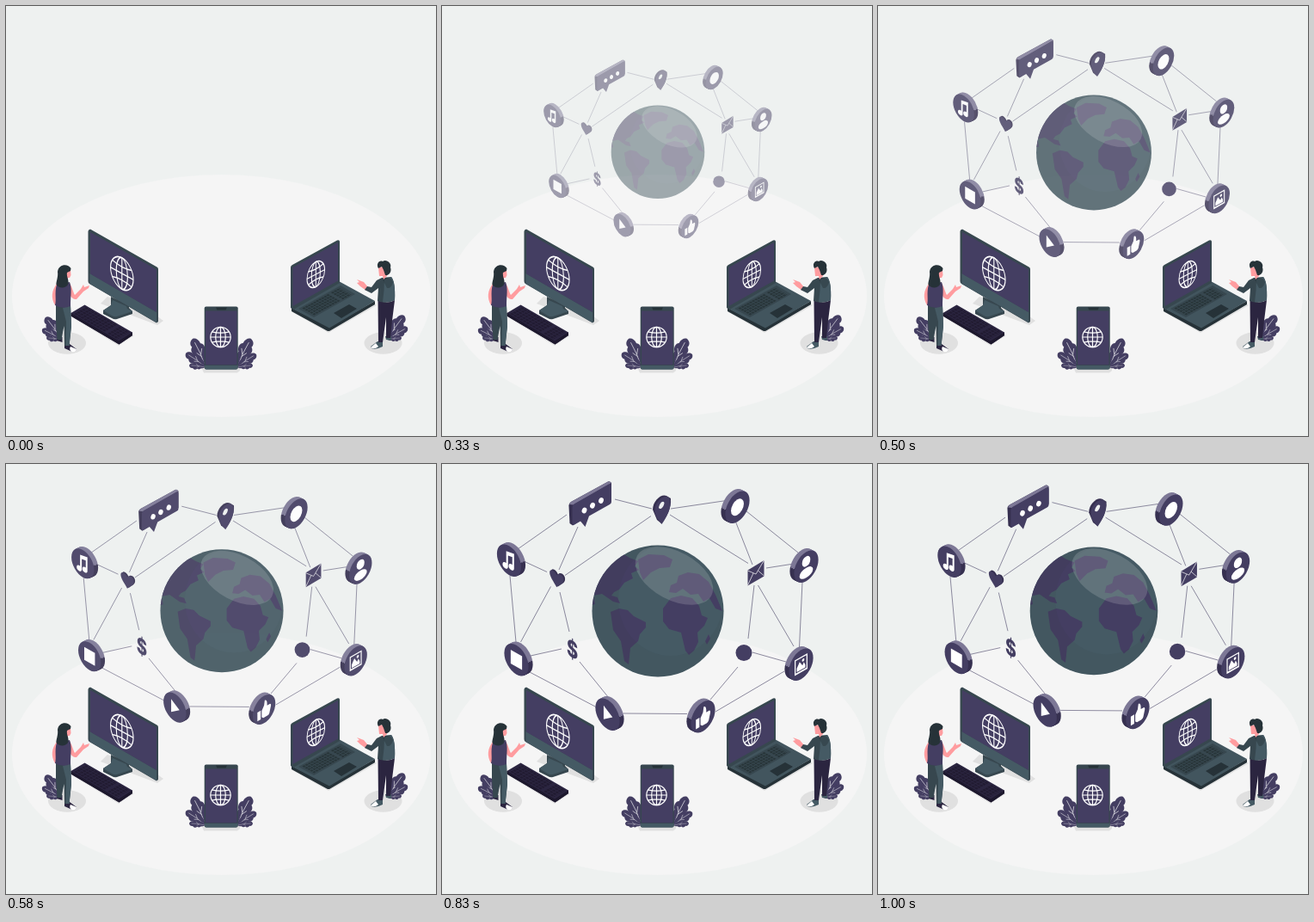
Recreate the animation shown at these times as an HTML page. Size 500 by 500 pixels, loop 1040 ms.

```html
<!DOCTYPE html>
<html lang="en">
<head>
<meta charset="utf-8">
<title>Connected world</title>
<style>
  html, body { margin: 0; width: 100%; height: 100%; overflow: hidden; background: #eef1f0; }
  svg { display: block; width: 100vw; height: 100vh; }
  .purple { fill: #443e62; }
  .dusk { fill: #363050; }
  .night { fill: #2b2540; }
  .slate { fill: #455a64; }
  .deep { fill: #37474f; }
  .ink { fill: #263238; }
  .skin { fill: #ff9c9f; }
  .shade { fill: #e0e0e0; }
  .white { fill: #fff; }
  .line { fill: none; stroke: #fff; }
  .links { fill: none; stroke: #443e62; stroke-width: .6; }
</style>
</head>
<body>
<svg viewBox="0 0 500 500">
  <defs>
    <linearGradient id="rim" x1="0" y1="0" x2="0" y2="1">
      <stop offset=".38" stop-color="#7d7896"/>
      <stop offset=".38" stop-color="#363050"/>
    </linearGradient>
    <clipPath id="ball"><circle cx="251" cy="171" r="76.5"/></clipPath>
    <g id="web" class="line">
      <circle r="11.700"/>
      <ellipse rx="5.800" ry="11.700"/>
      <path d="M0-11.700V11.700M-11.700 0H11.700M-10-6.200Q0-3.600 10-6.200M-10 6.200Q0 3.600 10 6.200"/>
    </g>
    <g id="leaf">
      <path class="purple" d="M0 0C4-5 8-8 14-6.500C17-10 22-9 23-6C27-6 30-3 30 0C29 4 26 6 23 4.500C21 8 17 8 15 5C12 7 9 6 8 3.500C5 3.500 2 2 0 0Z"/>
      <path class="line" stroke-width=".6" opacity=".85" d="M1 0Q14-2 26-.5M13-1.200L18-5M11-1L16 2.500"/>
    </g>
    <path id="love" d="M0-4C-3-9-9-8-9-3C-9 2-4 5 0 10C4 5 9 2 9-3C9-8 3-9 0-4Z"/>
  </defs>

  <ellipse cx="250.500" cy="337" rx="243.500" ry="141" fill="#f5f5f5"/>
  <g class="shade">
    <ellipse cx="71" cy="392" rx="22" ry="12.700"/>
    <ellipse cx="438.500" cy="392" rx="22" ry="12.700"/>
    <path d="M110 346L176 371L183 366L172 358L118 338ZM75 361L131 395L149 383L140 380ZM228 422L233 420H272V424L269 426.500H230ZM333 356L375 380L431 348L420 342Z"/>
  </g>
  <g id="plants"></g>

  <!-- desktop -->
  <path class="deep" d="M113 354L122 348V338L143 348V351L147 355V358L129 364Q126 365 123 363L113 358Z"/>
  <path class="slate" d="M113 354L122 348L124 342L140 349L141 352L147 355L129 361Q126 362 123 360Z"/>
  <path class="deep" d="M95.500 262Q95.500 260 98 259.500L175.500 303.500Q177 304 177 306V367L175 368.500L97 323Q95.500 322 95.500 320Z"/>
  <path class="slate" d="M97.500 311L175 356V368L97.500 323Z"/>
  <path class="purple" d="M98 263L175 306.500V356L98 311.500Z"/>
  <use href="#web" transform="matrix(1.130 .620 0 1.560 134.800 311)" stroke-width="1"/>
  <path class="night" d="M75.500 357L91.500 347.500L147 379.500V383L131.500 393.500L75.500 360.500Z"/>
  <path d="M75.500 357L131 389.500L147 379.500V383L131.500 393.500L75.500 360.500Z" fill="#1d182d"/>
  <g id="deskKeys" transform="matrix(.55 .32 -.16 .09 92 348.300)" stroke="#211b31"></g>

  <!-- laptop -->
  <path class="ink" d="M332 351L376 373L429 343V347L377 377.500Q375 378.500 373 377.500L332 355Z"/>
  <path d="M332 351.500L387 320L429 343L376 374.500Z" fill="#42555e"/>
  <path class="deep" d="M331 304Q331 302 333 301L385 272.500Q388 271.500 388 274V322L334 353L331 351Z"/>
  <path class="purple" d="M333.500 304L386 275V319.500L333.500 349Z"/>
  <use href="#web" transform="matrix(.880 -.460 0 1.240 360.300 312)" stroke-width="1.150"/>
  <path class="deep" d="M340 352L389 325L406 335L358 362Z"/>
  <g id="lapKeys" transform="matrix(.47 -.257 .16 .09 341.500 352)" stroke="#283539"></g>
  <path class="ink" d="M381 357L399 347L408 352L390 363Z"/>

  <!-- phone -->
  <rect class="deep" x="230.700" y="349.500" width="39" height="73" rx="2"/>
  <path class="slate" d="M231 418H269.500V420.500Q269.500 422.500 267.500 422.500H233Q231 422.500 231 420.500Z"/>
  <rect class="purple" x="232" y="354.500" width="36.500" height="62.800"/>
  <path class="ink" d="M244 350.500H257L255.500 353.500H245.500Z"/>
  <use href="#web" transform="translate(249.500 385)" stroke-width="1.200"/>

  <!-- woman -->
  <path class="skin" d="M59 323C53 331 52 339 57 348L60 347C57 340 59 334 62 330Z"/>
  <path class="night" d="M60 385H65.500V391L59 389Z"/>
  <path class="night" d="M68 393H74L82 399Q82 402 77 402L68 398Z"/>
  <path class="white" d="M75 396L82 399Q82 403 76 402Q73 399 75 396Z"/>
  <path class="deep" d="M58 346Q66 352 75 348L76 372L73.500 395H68L67.500 372L64.500 388H59.500L58 366Z"/>
  <path class="slate" d="M66 351L75 348L76 372L73.500 395H69.500L70 367Z"/>
  <path class="skin" d="M73 321C77 326 78 333 80 336L87 329L90 324L91 327L97 325L96 328L90 332L82 341C76 342 73 334 72 328Z"/>
  <path class="purple" d="M59 324L74 321C77 329 75 336 75 349Q66 353 57 348C59 341 56 334 59 324Z"/>
  <path class="skin" d="M69 304L75 307L75.500 313L74 316H72V321L68 320Z"/>
  <path class="ink" d="M60 309C61 300 72 299 75.500 305L75 308L71 310C70 315 74 319 72 324C69 329 61 328 58.500 324C58 321 61 315 60 309Z"/>

  <!-- man -->
  <path class="slate" d="M441 384H448V389L442 388Z"/>
  <path class="slate" d="M432 390H438V396Q430 400 425 398L424 396Z"/>
  <path class="white" d="M430 392L433 396Q428 400 424 397Z"/>
  <path class="night" d="M432.500 342Q443 347 452 342L449 366L447 386H442L442 362L438 391H433Z"/>
  <path class="skin" d="M421 327L416 321L408 318L411 321L408 322L412 326L419 331Z"/>
  <path class="deep" d="M437 316L448 315Q453 321 452 342Q442 347 432 343L433 328L425 334L417 330L420 326L425 327L431 319Z"/>
  <path class="slate" d="M440 318L448 315Q453 321 452 342Q445 345 438 344Q440 330 440 318Z"/>
  <path class="ink" d="M438 318Q447 313 450 321Q448 329 443 328Z" opacity=".45"/>
  <path class="skin" d="M433 304L441 303L443 314L439 318L438 314H434Z"/>
  <path class="ink" d="M433 305C430 300 434 295 438 297C442 294 449 299 447 304C449 309 445 314 441 313L439 307L437 303Z"/>

  <!-- network -->
  <g id="net">
    <path class="links" d="M201 41L244 52M266 52L334 42M354 55L414 103M341 66L361 117M265 59L356 115.500M377 121L409 116M419 137L415.500 213M367.500 141L409 212M363 141L356 203M361 219L400 230M344 236L312 274M398 241L318 288M285 290.500L211 290M180 283L102 242M194 272L160 230M103 223L139 215M86 207L79 130M91.500 207L126.500 142.500M137 149L148 195M95 113L122 125.500M88 99L145 59M136 123L158 73M143 129.500L243 60.500"/>

    <circle class="slate" cx="251" cy="171" r="76.500"/>
    <g clip-path="url(#ball)">
      <path class="purple" d="M170 150L190 118L208 103L218 109L228 113L224 119L229 123L220 127L222 133L212 138L206 146L200 149L197 153L204 155L207 162L199 160L186 151L176 153L178 163L170 165Z
        M196 172L206 168L216 170L223 177L237 184L237 190L230 198L228 206L219 214L217 233L212 229L208 206L199 193Z
        M228 111L240 105L258 106L268 111L265 120L253 121L243 126L234 135L230 126Z
        M257 168L266 156L278 153L291 156L299 165L302 176L309 179L305 188L297 196L298 207L293 217L287 222L283 217L278 196L264 192L257 183Z
        M264 149L266 141L273 138L275 130L286 126L299 128L310 137L318 152L326 171L318 168L311 156L304 160L298 151L289 152L280 145L272 150Z
        M306 206L310 198L312 203L308 210Z"/>
      <path d="M174 94H328V248H174ZM205 158A61 65 0 1 0 327 158A61 65 0 1 0 205 158Z" fill-rule="evenodd" fill="#263238" opacity=".08"/>
      <ellipse cx="270" cy="130" rx="49" ry="28" transform="rotate(28 270 130)" fill="#fff" opacity=".15"/>
    </g>

    <!-- chat bubble -->
    <path class="dusk" d="M147.500 49Q147 46 150 44L193 20.500Q195 19.500 197 22L197 43L152 71.500L148.500 69Z"/>
    <path d="M148 47L150 44L193 20.500Q195 19.500 197 22L153 47.500Z" fill="#7d7896"/>
    <path class="purple" d="M151.500 50Q151.500 48 153.500 46.500L194 23.500Q197 22 197 25V44Q197 46 195 47L171 60.500L166.500 73L161 66.500L154 70.500Q151.500 72 151.500 69Z"/>
    <g class="white">
      <ellipse cx="165.500" cy="54" rx="2.800" ry="3.500" transform="rotate(20 165.500 54)"/>
      <ellipse cx="175" cy="48.300" rx="2.800" ry="3.500" transform="rotate(20 175 48.300)"/>
      <ellipse cx="185" cy="42.500" rx="2.800" ry="3.500" transform="rotate(20 185 42.500)"/>
    </g>

    <!-- pin -->
    <path class="dusk" d="M245 53C245 43 255 34 261 37L266 40C267 52 261 62 255 69L250 65Z"/>
    <path class="purple" d="M247.500 55C247 45 257 35 263 38.500C269 43 264 58 255.500 70C252 66 248 61 247.500 55Z"/>
    <path d="M252 51C253 45 257 42 258.500 45C258 50 254 54 252 51Z" fill="#eef1f0"/>

    <!-- envelope -->
    <path class="purple" d="M355.500 123.500L374.500 112V130.500L355.500 141.500Z"/>
    <path class="line" stroke-width=".7" d="M355.500 124L365 128L374.500 112M355.500 141L362 127M374.500 130L367.500 124"/>

    <use href="#love" class="dusk" transform="matrix(.900 .480 0 1 135 132.500)"/>
    <use href="#love" class="purple" transform="matrix(.900 .480 0 1 133.300 133.300)"/>

    <text class="purple" transform="matrix(.740 .400 0 1 151.500 215.500)" y="9.500" font-family="Inter, Arial, sans-serif" font-size="27" font-weight="800" text-anchor="middle">$</text>
    <circle class="purple" cx="351" cy="219.500" r="9.500"/>
    <g id="coins"></g>
  </g>
</svg>
<script>
const $ = id => document.getElementById(id);

// base x, base y, tip x, tip y
const leaves = [
  [64, 388, 46, 362], [64, 388, 42, 376], [64, 388, 47, 386],
  [444, 388, 463, 360], [444, 388, 467, 374], [444, 388, 460, 386],
  [232, 420, 217, 387], [232, 420, 209, 404], [232, 420, 213, 418],
  [269, 420, 285, 387], [269, 420, 291, 405], [269, 420, 287, 418]
];
$('plants').innerHTML = leaves.map(([x, y, tx, ty]) => {
  const turn = Math.atan2(ty - y, tx - x) * 180 / Math.PI;
  const size = Math.hypot(tx - x, ty - y) / 30;
  const flip = tx < x ? -1 : 1;
  return `<use href="#leaf" transform="translate(${x} ${y}) rotate(${turn}) scale(${size} ${size * flip * .85})"/>`;
}).join('');

// Rows of keys are dashed lines in the keyboard's own plane.
function keys(id, rows) {
  const step = 92 / rows;
  $(id).innerHTML = Array.from({ length: rows }, (_, i) => {
    const y = 4 + step * (i + .5);
    return `<path fill="none" stroke-width="${step * .72}" stroke-dasharray="5 1.6" d="M4 ${y}H70M75 ${y}H96"/>`;
  }).join('');
}
keys('deskKeys', 5);
keys('lapKeys', 5);

const icons = {
  note: '<path class="white" d="M-4-9L7-11V6A3.800 3.400 0 1 1 4.500 3V-6L-1.500-5V8A3.800 3.400 0 1 1-4 5Z"/>',
  dot: '<circle class="white" r="9"/>',
  square: '<rect class="white" x="-8" y="-8" width="16" height="16"/>',
  person: '<circle class="white" cy="-6" r="5.800"/><ellipse class="white" cy="7.200" rx="9.500" ry="5.800"/>',
  photo: '<path class="white" fill-rule="evenodd" d="M-9-9H9V9H-9ZM-7.500-7.500V7H7.500V-7.500Z"/><path class="white" d="M-6 6V2L-2-4L2 2L4-1L6 3V6Z"/><circle class="white" cx="3" cy="-4" r="1.700"/>',
  thumb: '<path class="white" d="M-10-1H-5V10H-10ZM-3.500 0L0-5L1-11Q5-11 4.500-3H9Q11-2 10 1L8 8Q7 10 5 10H-1L-3.500 8Z"/>',
  play: '<path class="white" d="M-5.500-8L7 0L-5.500 8Z"/>'
};

// x, y, side the face turns to, icon
const coins = [
  [80.500, 111, -1, 'note'], [341, 49, 1, 'dot'], [421, 118, 1, 'person'], [415, 232, 1, 'photo'],
  [301, 292.500, 1, 'thumb'], [195, 290, -1, 'play'], [89, 226.500, -1, 'square']
];
$('coins').innerHTML = coins.map(([x, y, side, icon]) => {
  const at = k => `transform="matrix(.83 ${-side * .47} 0 1 ${x + side * k} ${y + k * .5})"`;
  const edge = [-2.5, -1.5, -.5, .5, 1.5].map(k => `<circle r="17" fill="url(#rim)" ${at(k)}/>`).join('');
  return `${edge}<g ${at(2.5)}><circle class="purple" r="17"/>${icons[icon]}</g>`;
}).join('');

const LOOP = 1040, STEP = 1000 / 24, FIRST = 4;
const sizes = [.555, .71, .875, .977, 1, .971];
const fades = [.17, .48, .82, .98, 1, 1];

// Smooth curve through evenly spaced values.
function curve(v, u) {
  const i = Math.min(Math.floor(u), v.length - 2), f = u - i;
  const b = v[i], c = v[i + 1];
  const a = v[i - 1] ?? 2 * b - c, d = v[i + 2] ?? 2 * c - b;
  return b + f / 2 * (c - a + f * (2 * a - 5 * b + 4 * c - d + f * (3 * (b - c) + d - a)));
}

function draw(time) {
  const tick = Math.min(24, Math.floor((time % LOOP + 5) / STEP));
  const net = $('net');
  if (tick < FIRST) {
    net.setAttribute('opacity', 0);
    return;
  }
  const u = (tick - FIRST) / 4;
  net.setAttribute('opacity', Math.min(1, curve(fades, u)));
  net.setAttribute('transform', `translate(251 166.5) scale(${curve(sizes, u)}) translate(-251 -166.5)`);
}

const start = performance.now();
function loop() {
  draw(performance.now() - start);
  requestAnimationFrame(loop);
}
loop();
</script>
</body>
</html>
```
